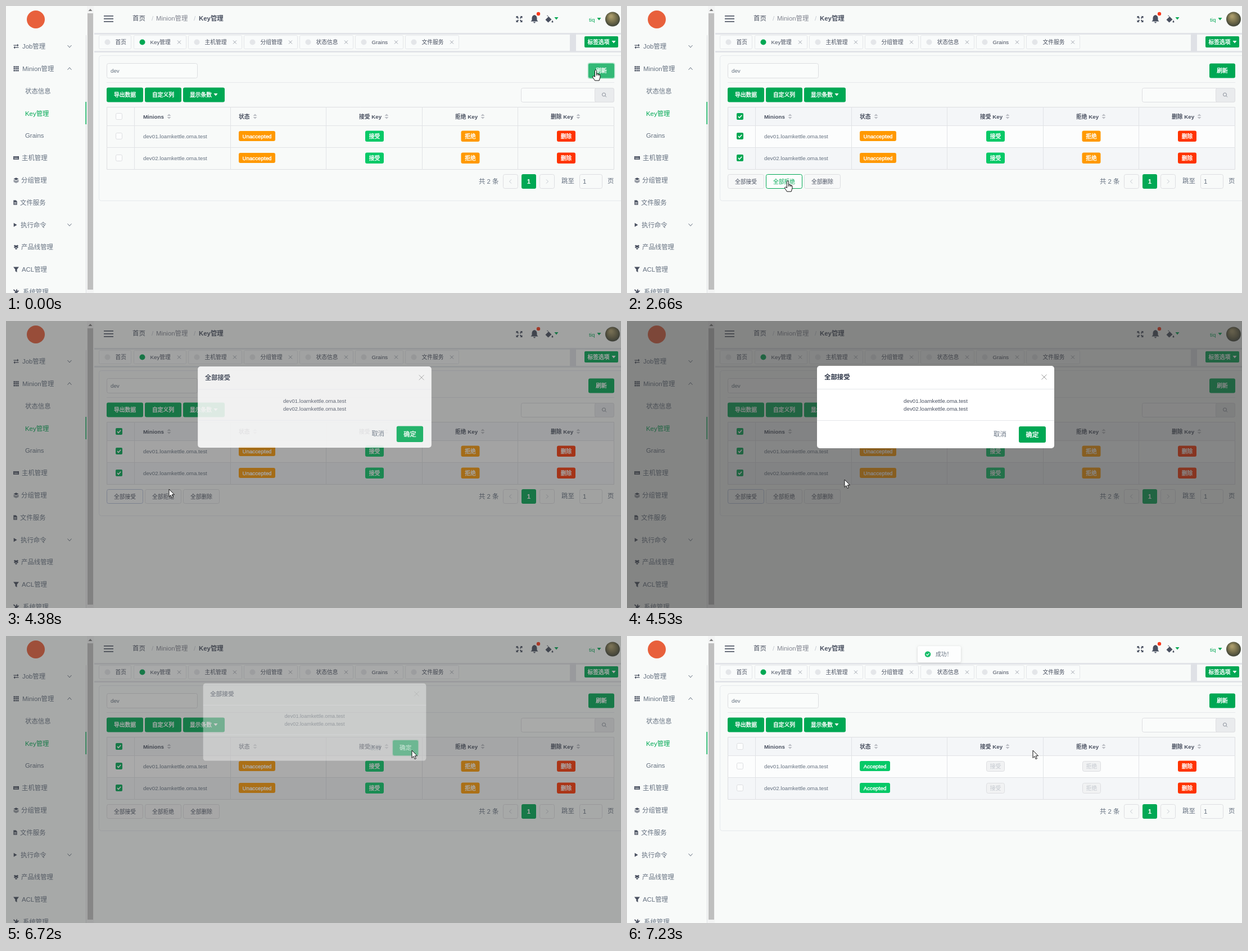
Recreate the animation shown at these times as an HTML page with a canvas. Size 1094 by 512 pixels, loop 8 s.

```html
<!DOCTYPE html>
<html lang="zh">
<head>
<meta charset="utf-8">
<style>
html, body { margin: 0; width: 100%; height: 100%; overflow: hidden; background: #f8faf9; }
canvas { display: block; }
</style>
</head>
<body>
<canvas id="stage" width="1094" height="512"></canvas>
<script>
const ctx = document.getElementById('stage').getContext('2d');
const LOOP = 8000;
const GREEN = '#00a854', LIME = '#06c967', ORANGE = '#ff9900', RED = '#ff3300';
const PAGE = '#f8faf9', LINE = '#dddee1', INK = '#495060', MUTED = '#657180', PALE = '#c3c8cf';
const S = 9.75, M = 11.4;
const hosts = ['dev01.loamkettle.oma.test', 'dev02.loamkettle.oma.test'];

// [time, x, y, shape]; each pose holds until the next one
const cursorPath = [
  [0, 1049, 114, 'hand'], [250, 1047, 115, 'hand'], [400, 985, 135, 'arrow'], [520, 807, 155, 'arrow'],
  [670, 520, 172, 'arrow'], [790, 257, 183, 'arrow'], [950, 211, 187, 'arrow'], [1100, 202, 191, 'hand'],
  [1220, 199, 199, 'hand'], [1370, 199, 198, 'hand'], [1760, 250, 215, 'arrow'], [1880, 384, 226, 'arrow'],
  [2030, 658, 284, 'arrow'], [2150, 520, 298, 'arrow'], [2270, 390, 306, 'arrow'], [2400, 310, 311, 'hand'],
  [2520, 287, 312, 'hand'], [2660, 286, 312, 'hand'], [3340, 272, 312, 'hand'], [3460, 250, 312, 'hand'],
  [3610, 222, 311, 'hand'], [3760, 218, 311, 'hand'], [4260, 219, 311, 'arrow'], [4380, 290, 300, 'arrow'],
  [4530, 387, 283, 'arrow'], [4660, 504, 245, 'arrow'], [4810, 592, 230, 'arrow'], [4930, 681, 213, 'arrow'],
  [5080, 722, 204, 'hand'], [6720, 722, 204, 'arrow']
];
const maskFade = [[0, 0], [4260, .3], [4380, .75], [4530, 1], [6720, .7], [6840, .27], [6960, .06], [7080, 0]];
const modalFade = [[0, 0], [4260, .3], [4380, .85], [4530, 1], [6720, .4], [6840, 0]];
const toastFade = [[0, 0], [6960, .3], [7080, .9], [7230, 1]];

const held = (keys, t) => keys.filter(k => k[0] <= t).pop();
const during = (t, a, b) => t >= a && t < b;

function box(x, y, w, h, fill, stroke, r = 3) {
  ctx.beginPath();
  const o = stroke ? .5 : 0;
  ctx.roundRect(x + o, y + o, w - 2 * o, h - 2 * o, r);
  if (fill) { ctx.fillStyle = fill; ctx.fill(); }
  if (stroke) { ctx.strokeStyle = stroke; ctx.lineWidth = 1; ctx.stroke(); }
}

function text(s, x, y, color = INK, size = S, bold = false, align = 'left') {
  ctx.font = `${bold ? 'bold ' : ''}${size}px "Liberation Sans", "Noto Sans CJK SC", "Noto Sans CJK", sans-serif`;
  ctx.textAlign = align;
  ctx.fillStyle = color;
  ctx.fillText(s, x, y + size * .36);
}

// white text on colour: regular widths, slightly heavier strokes
function label(s, x, y, size = S, align = 'center') {
  text(s, x, y, '#fff', size, false, align);
  ctx.strokeStyle = '#fff';
  ctx.lineWidth = .4;
  ctx.strokeText(s, x, y + size * .36);
}

function dot(x, y, r, color) {
  ctx.beginPath();
  ctx.arc(x, y, r, 0, 7);
  ctx.fillStyle = color;
  ctx.fill();
}

function shape(d, x, y, fill, stroke, width = 1) {
  const p = new Path2D(d);
  ctx.save();
  ctx.translate(x, y);
  if (fill) { ctx.fillStyle = fill; ctx.fill(p); }
  if (stroke) { ctx.strokeStyle = stroke; ctx.lineWidth = width; ctx.stroke(p); }
  ctx.restore();
}

const rule = (x, y, w, h, color = LINE) => { ctx.fillStyle = color; ctx.fillRect(x, y, w, h); };
const caret = (x, y, color) => shape('M-3.5-2h7L0 2.5Z', x, y, color);
const cross = (x, y, r, color) => shape(`M${-r} ${-r}L${r} ${r}M${r} ${-r}L${-r} ${r}`, x, y, null, color);

function solid(s, x, y, w, h, fill = GREEN, size = S) {
  box(x, y, w, h, fill);
  label(s, x + w / 2, y + h / 2, size);
}

function outlined(s, x, y, w, h, fill, color, edge) {
  box(x, y, w, h, fill, edge);
  text(s, x + w / 2, y + h / 2, color, S, false, 'center');
}

function ring(x, y, w, h) {
  box(x - 1.5, y - 1.5, w + 3, h + 3, 'rgba(0,168,84,.25)', null, 4);
}

function checkbox(y, level) {
  box(195, y - 6, 12, 12, '#fcfdfd', LINE, 2);
  if (!level) return;
  ctx.globalAlpha = level;
  box(195, y - 6, 12, 12, GREEN, null, 2);
  shape('M-3 0L-1 2.5 3.2-2.2', 201, y, null, '#fff', 1.6);
  ctx.globalAlpha = 1;
}

const icons = {
  swap: 'M-4.5-2.5H2V-4.5L4.5-2 2 .5V-1.3H-4.5ZM4.5 2.5H-2V4.5L-4.5 2-2-.5V1.3H4.5Z',
  grid: [-4.5, -1.2, 2.1].map(y => [-4.5, -1.2, 2.1].map(x => `M${x} ${y}h2.5v2.5h-2.5z`).join('')).join(''),
  server: 'M-5-3H5V3H-5ZM-3.5-1.7v1h1v-1zM-1.2-1.7v1h1v-1zM1.2-1.7v1h1v-1zM-3.5.6v1h7v-1z',
  layers: 'M0-4.5L4.5-2.2 0 0-4.5-2.2ZM-4.5-.5L0 1.8 4.5-.5V.6L0 2.9-4.5 .6ZM-4.5 1.8L0 4 4.5 1.8V2.7L0 5-4.5 2.7Z',
  file: 'M-3.2-4.2H1L3.2-2V4.2H-3.2ZM-2-.5v1h4v-1zM-2 1.7v1h4v-1z',
  play: 'M-2.8-3.5L3 0-2.8 3.5Z',
  cubes: 'M-2.2-4L0-2.6 2.2-4 4.3-2.4 2.3-1 4.3 .4 2.2 1.8 0 .4-2.2 1.8-4.3 .4-2.3-1-4.3-2.4ZM-2.2 2.7L0 1.3 2.2 2.7 0 4.2Z',
  funnel: 'M-5-4.5H5L1.5 0V5L-1.5 3V0Z',
  wrench: 'M-5 4L0-1Q-1-4 2-5L1.5-2.5 3.5-1.5 5-3Q5 1 1.5.7L-3.5 5.3ZM-4-4.5L4.5 3.5 3.5 5-5-3Z'
};

const menu = [
  ['swap', 'Job管理', 29, 1], ['grid', 'Minion管理', 29, -1], [null, '状态信息', 34], [null, 'Key管理', 34],
  [null, 'Grains', 34], ['server', '主机管理', 28], ['layers', '分组管理', 27], ['file', '文件服务', 25],
  ['play', '执行命令', 26, 1], ['cubes', '产品线管理', 27], ['funnel', 'ACL管理', 28], ['wrench', '系统管理', 30]
];

function sidebar() {
  dot(53, 24, 16, '#e8603c');
  rule(142, 52, 1, 460);
  menu.forEach(([icon, name, x, fold], i) => {
    const y = 72 + i * 39.8;
    if (icon) shape(icons[icon], icon === 'play' || icon === 'file' ? 16.5 : 18, y, INK);
    text(name, x, y, i === 3 ? GREEN : MUTED, M);
    if (fold) shape(`M-3.5 ${-2 * fold}L0 ${2 * fold} 3.5 ${-2 * fold}`, 113, y, null, MUTED);
  });
  rule(141.5, 171, 1.5, 40, GREEN);
  rule(144, 0, 12, 512, '#f3f4f4');
  rule(145, 13, 10, 493, '#bfbfbf');
  shape('M-3.5 2L0-2 3.5 2Z', 150, 7, '#7d7d7d');
}

const tabs = [
  ['首页', 165, 58], ['Key管理', 227, 94], ['主机管理', 324, 96], ['分组管理', 423, 96],
  ['状态信息', 522, 96], ['Grains', 621, 86], ['文件服务', 710, 96]
];

function header() {
  [17, 22, 27].forEach(y => rule(174, y, 17, 1.6, INK));
  text('首页', 225, 22, INK, M);
  text('/', 259, 22, PALE, M);
  text('Minion管理', 267, 22, '#80848f', M);
  text('/', 334, 22, PALE, M);
  text('Key管理', 343, 22, INK, M, true);

  for (let i = 0; i < 4; i++) {
    ctx.save();
    ctx.translate(913, 23.5);
    ctx.rotate(i * Math.PI / 2);
    shape('M1.5-5.5H5.5V-1.5L4.2-2.8 2.2-.8.8-2.2 2.8-4.2Z', 0, 0, INK);
    ctx.restore();
  }
  shape('M0-7Q4.5-6 4.5-1V2L6.5 4.5H-6.5L-4.5 2V-1Q-4.5-6 0-7ZM-2 5.5H2Q1.5 7.5 0 7.5T-2 5.5Z', 940, 23, INK);
  dot(947, 14, 3.2, '#fb3a1c');
  shape('M-3-6.5L4.5 1-1.5 6.5-6.5 1.5-1-4-4-5.8ZM6 2.5Q9 6.5 6 6.5T6 2.5Z', 966, 23, INK);
  caret(979, 22, GREEN);
  text('tiq', 1037, 24, GREEN, S);
  caret(1055, 23, GREEN);
  const g = ctx.createRadialGradient(1076, 18, 2, 1079, 23, 14);
  g.addColorStop(0, '#a89a6a');
  g.addColorStop(.6, '#6d6848');
  g.addColorStop(1, '#3c4238');
  dot(1079, 23.5, 13, g);

  rule(157, 48, 937, 3, '#e2e4e8');
  rule(157, 80, 937, 3, '#e2e4e8');
  rule(1003, 48, 11, 33, '#dfe1e6');
  tabs.forEach(([name, x, w], i) => {
    box(x, 52, w, 25, '#f9fbfb', '#e5e7ea', 2);
    dot(x + 15.5, 64.5, 5, i === 1 ? GREEN : '#e4e6e9');
    text(name, x + 29.5, 64.5, INK);
    if (i) cross(x + w - 13, 64.5, 3, '#a0a5ae');
  });
  box(1029, 54, 60, 20, GREEN, null, 2);
  label('标签选项', 1034.5, 64, S, 'left');
  caret(1081, 64, '#fff');
}

function sorter(x) {
  shape('M-3.5-1L0-4.5 3.5-1ZM-3.5 1H3.5L0 4.5Z', x, 197, '#bbbec4');
}

function table(t) {
  const accepted = t >= 7080;
  if (t >= 1370) rule(179, 180, 903, 33, '#f4f6f8');
  if (t >= 1520) {
    rule(179, 213, 903, 39, '#fcfdfd');
    rule(179, 252, 903, 40, '#f4f6f8');
  }
  box(179, 180, 903, 112, null, LINE, 0);
  [228, 399, 569, 740, 910].forEach(x => rule(x, 180, 1, 112, '#e1e3e6'));
  [213, 252].forEach(y => rule(179, y, 903, 1, '#e1e3e6'));
  [['Minions', 244, 290], ['状态', 414, 443], ['接受 Key', 628, 677], ['拒绝 Key', 799, 848], ['删除 Key', 969, 1018]]
    .forEach(([name, x, s]) => { text(name, x, 197, INK, S, true); sorter(s); });
  checkbox(197, during(t, 1520, 7080) ? 1 : during(t, 7080, 7230) ? .3 : 0);
  hosts.forEach((host, i) => {
    const y = 232 + i * 39, top = y - 9.5;
    checkbox(y, during(t, 1520, 7080) ? 1 : 0);
    text(host, 244, y, MUTED);
    if (accepted) {
      solid('Accepted', 414, y - 9, 54, 18, LIME);
      outlined('接受', 639, y - 9, 33, 19, '#f1f2f3', PALE, LINE);
      outlined('拒绝', 810, y - 9, 33, 19, '#f1f2f3', PALE, LINE);
    } else {
      solid('Unaccepted', 414, y - 9, 65, 18, ORANGE);
      solid('接受', 639, top, 33, 19.4, LIME);
      solid('拒绝', 809.5, top, 33, 19.4, ORANGE);
    }
    solid('删除', 980, top, 33, 19.4, RED);
  });
}

function pager() {
  text('共 2 条', 841, 313, MUTED, M);
  box(884, 300, 27, 26, null, LINE);
  shape('M2-3.5L-1.5 0 2 3.5', 897, 313, null, PALE);
  box(917, 300, 26, 26, GREEN);
  text('1', 930, 313, '#fff', M, true, 'center');
  box(949, 300, 27, 26, null, LINE);
  shape('M-2-3.5L1.5 0-2 3.5', 963, 313, null, PALE);
  text('跳至', 988, 312, MUTED, M);
  box(1020, 300, 41, 26, null, LINE);
  text('1', 1026, 313, MUTED, M);
  text('页', 1070, 312, MUTED, M);
}

function card(t) {
  box(165, 88, 960, 260, null, '#e6e9ed', 4);
  box(179, 102, 162, 27, '#fafcfb', LINE);
  text('dev', 186, 115, MUTED);
  rule(179, 136, 903, 1, '#e6e8eb');
  if (t < 1520) ring(1036, 102.5, 46, 26);
  solid('刷新', 1036, 102.5, 46, 26, t < 400 ? '#33b976' : GREEN);
  solid('导出数据', 179, 145.5, 65, 26);
  solid('自定义列', 247, 145.5, 65, 26);
  box(315, 145.5, 74, 26, GREEN);
  label('显示条数', 327, 158.5, S, 'left');
  caret(373, 158, '#fff');
  box(916, 146, 166, 26, '#fafcfb', LINE);
  box(1047, 146, 35, 26, '#e9ebed', LINE);
  shape('M2.5-.5a3 3 0 1 1-6 0a3 3 0 1 1 6 0ZM1.5 1.5L4 4', 1064, 158.5, null, '#8a919c');
  table(t);
  if (during(t, 1520, 7080)) {
    const hovered = during(t, 2400, 3610) ? 1 : during(t, 3610, 4380) ? 0 : -1;
    ['全部接受', '全部拒绝', '全部删除'].forEach((name, i) => {
      const on = i === hovered;
      const edge = on ? GREEN : i === 0 && during(t, 4380, 4810) ? '#b5c0da' : LINE;
      outlined(name, 179 + i * 68, 300, 65, 26, on ? '#fcfefd' : '#f7f8f8', on ? GREEN : INK, edge);
    });
  }
  pager();
}

function modal(t) {
  const level = held(modalFade, t)[1];
  if (!level) return;
  ctx.save();
  ctx.globalAlpha = level;
  const k = .9 + .1 * level;
  ctx.translate(549, 153);
  ctx.scale(k, k);
  ctx.translate(-549, -153);
  box(338, 80, 422, 147, '#fff', null, 5);
  text('全部接受', 351, 100, '#2a3244', M, true);
  cross(742, 100, 4.5, '#999');
  rule(338, 121, 422, 1, '#e5e7ea');
  rule(338, 177, 422, 1, '#e5e7ea');
  hosts.forEach((host, i) => text(host, 549, 142 + i * 14.5, INK, S, false, 'center'));
  text('取消', 652, 202, MUTED, M);
  if (t >= 5510) ring(697, 188, 48, 29);
  solid('确定', 697, 188, 48, 29, t >= 5510 ? '#00a050' : during(t, 5080, 5510) ? '#33b976' : GREEN, M);
  ctx.restore();
}

function toast(t) {
  const level = held(toastFade, t)[1];
  if (!level) return;
  ctx.save();
  ctx.globalAlpha = level;
  ctx.translate(0, (level - 1) * 14);
  ctx.shadowColor = 'rgba(0,0,0,.15)';
  ctx.shadowBlur = 4;
  ctx.shadowOffsetY = 1;
  box(517, 18, 77, 29, '#fdfefe');
  ctx.shadowColor = 'transparent';
  dot(535, 32.5, 5.3, '#19be6b');
  shape('M-2.5 0L-.7 1.9 2.6-1.6', 535, 32.5, null, '#fff', 1.2);
  text('成功！', 549, 32.5, MUTED);
  ctx.restore();
}

function cursor(t) {
  const [, x, y, kind] = held(cursorPath, t);
  if (kind === 'arrow') {
    shape('M0 0V13.5L3 10.6 5.2 15.6 7.4 14.6 5.2 9.8H9.5Z', x, y, '#fff', '#111');
    return;
  }
  if (during(t, 4010, 4260)) shape('M9 0A9 9 0 1 1-9 0A9 9 0 1 1 9 0', x + 1, y + 3, null, '#333');
  shape('M-1.5 1.5A1.5 1.5 0 0 1 1.5 1.5V6.5L6 7.5Q8 8 8 10V13L6.2 19H-1.5L-5 13.5Q-6 11.5-4.5 11T-1.5 12.5Z', x, y, '#fff', '#111');
  shape('M1.5 6.5V10M4 7.3V10M6 7.8V10.3', x, y, null, '#111');
}

function draw(now) {
  const t = now % LOOP;
  rule(0, 0, 1094, 512, PAGE);
  sidebar();
  header();
  card(t);
  rule(0, 0, 1094, 512, `rgba(55,55,55,${.6 * held(maskFade, t)[1]})`);
  modal(t);
  toast(t);
  cursor(t);
  requestAnimationFrame(draw);
}
requestAnimationFrame(draw);
</script>
</body>
</html>
```
